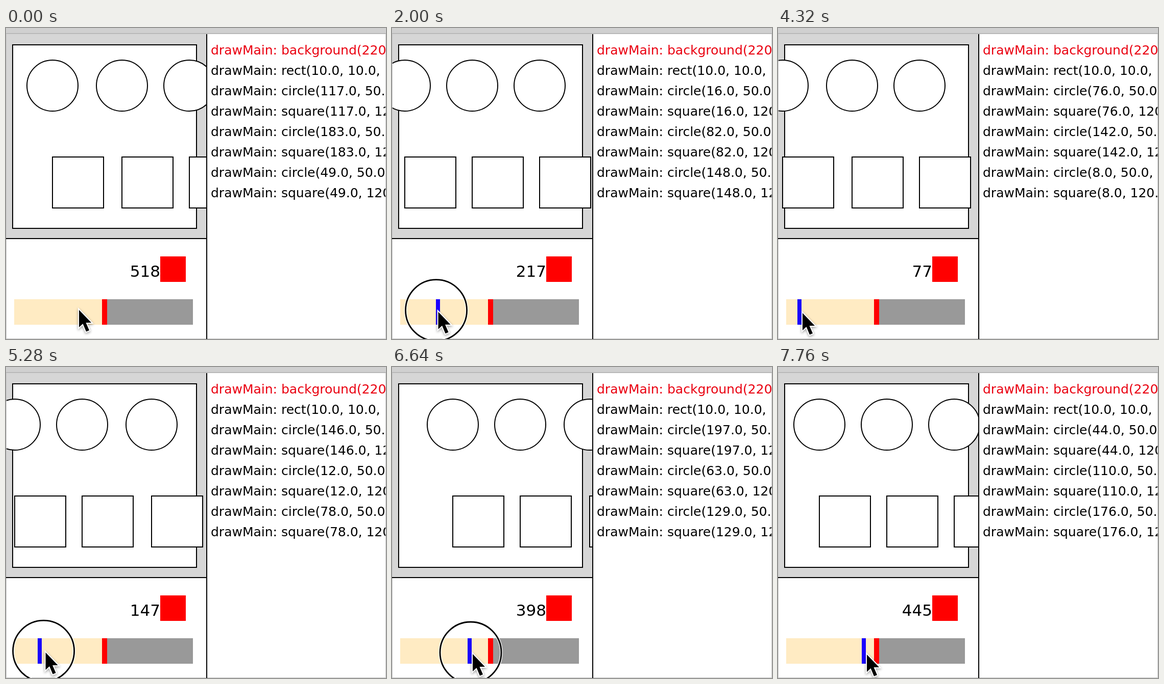
Recreate the animation shown at these times as an HTML page with a canvas. Size 744 by 610 pixels, loop 8 s.

```html
<!DOCTYPE html>
<html lang="en">
<head>
<meta charset="utf-8">
<title>Sketch timeline scrubber</title>
<style>
html, body { margin: 0; height: 100%; overflow: hidden; background: #fff; }
canvas { display: block; }
</style>
</head>
<body>
<canvas id="stage" width="744" height="610"></canvas>
<script>
const c = document.getElementById('stage').getContext('2d');
const LOOP = 8000, STEP = 80, HEAD = 518;
const FONT = '"DejaVu Sans", Verdana, sans-serif';
const ARROW = new Path2D('M4 3v34l7.5-7 6.5 15.5 6-2.5-6.5-15H28z');

// Each drag eases out from where the last one ended
const DRAGS = [
  { from: 80, to: 480, slot: 73, y: 550, power: 1 },
  { from: 1280, to: 2960, slot: 19, y: 556, power: 1.44 },
  { from: 4960, to: 6640, slot: 74, y: 560, power: 1.152 },
  { from: 6720, to: 7520, slot: 82, y: 561, power: 1 }
];

function handAt(t) {
  let slot = 66.5, y = 550;
  for (const d of DRAGS) {
    const u = Math.min(1, Math.max(0, (t - d.from) / (d.to - d.from)));
    const k = 1 - (1 - u) ** d.power;
    slot += (d.slot - slot) * k;
    y += (d.y - y) * k;
  }
  return { slot, y };
}

function box(color, x, y, w, h) {
  c.fillStyle = color;
  c.fillRect(x, y, w, h);
}

function outline(shape, ...args) {
  c.beginPath();
  c[shape](...args);
  c.fill();
  c.stroke();
}

function label(text, x, y, size, color, align) {
  c.font = size + 'px ' + FONT;
  c.fillStyle = color;
  c.textAlign = align;
  c.fillText(text, x, y);
}

function sketch(xs) {
  c.save();
  c.beginPath();
  c.rect(0, 12, 392, 400);
  c.clip();
  box('#d6d6d6', 0, 12, 392, 400);
  c.fillStyle = '#fff';
  c.strokeStyle = '#000';
  c.lineWidth = 2;
  outline('rect', 13, 33, 360, 360);
  for (const x of xs) {
    const px = 2 * x - 7;
    outline('arc', px, 113, 50, 0, 7);
    outline('rect', px, 253, 100, 100);
  }
  c.restore();
}

function callList(xs) {
  const calls = ['background(220.0)', 'rect(10.0, 10.0, 180.0, 180.0)'];
  for (const x of xs) {
    calls.push(`circle(${x.toFixed(1)}, 50.0, 50.0)`, `square(${x.toFixed(1)}, 120.0, 50.0)`);
  }
  calls.forEach((s, i) =>
    label('drawMain: ' + s, 401, 52 + 40 * i, 25, i ? '#000' : '#ea0010', 'left'));
}

function frame() {
  box('#d0d0d0', 0, 0, 744, 10);
  box('#b0b0b0', 0, 10, 744, 2);
  c.strokeStyle = '#c4c4c4';
  c.lineWidth = 1;
  c.strokeRect(0.5, 11.5, 743, 598);
  box('#000', 392, 12, 2, 598);
  box('#000', 0, 412, 392, 2);
}

function slider(slot, n, scrubbed) {
  label(n, 302, 488, 31, '#000', 'right');
  box('#f00', 302, 448, 50, 50);
  box('#ffebc3', 16, 532, 172, 50);
  box('#f00', 188, 532, 10, 50);
  box('#999', 198, 532, 168, 50);
  if (scrubbed) box('#1a00ff', 2 * Math.round(slot), 532, 8, 50);
}

function ring(x, y) {
  for (const [color, width] of [['rgba(255,255,255,.85)', 5.5], ['#000', 2.8]]) {
    c.strokeStyle = color;
    c.lineWidth = width;
    c.beginPath();
    c.arc(x, y, 60, 0, 7);
    c.stroke();
  }
}

function pointer(x, y) {
  c.save();
  c.translate(x, y);
  c.shadowColor = 'rgba(0,0,0,.4)';
  c.shadowBlur = 5;
  c.shadowOffsetY = 2;
  c.strokeStyle = '#fff';
  c.lineWidth = 4;
  c.stroke(ARROW);
  c.shadowColor = 'transparent';
  c.fillStyle = '#000';
  c.fill(ARROW);
  c.restore();
}

function draw(now) {
  const t = Math.floor(now % LOOP / STEP) * STEP;
  const scrubbed = t >= 640;
  const held = scrubbed && t < 3760 || t >= 4560 && t < 7760;
  // The pointer runs one step ahead; the counter trails the marker slightly
  const { slot } = handAt(t), hand = handAt(t + STEP), x = 2 * hand.slot + 6;
  const n = scrubbed ? Math.floor(5.841 * Math.round(slot - 0.2) - 33.9) : HEAD;
  const xs = [0, 66, 132].map(d => (n - 1 + d) % 200);

  box('#fff', 0, 0, 744, 610);
  callList(xs);
  sketch(xs);
  frame();
  slider(slot, n, scrubbed);
  if (held) ring(x, hand.y);
  pointer(x, hand.y);
}

const start = performance.now();
function tick() {
  draw(performance.now() - start);
  requestAnimationFrame(tick);
}
tick();
</script>
</body>
</html>
```
